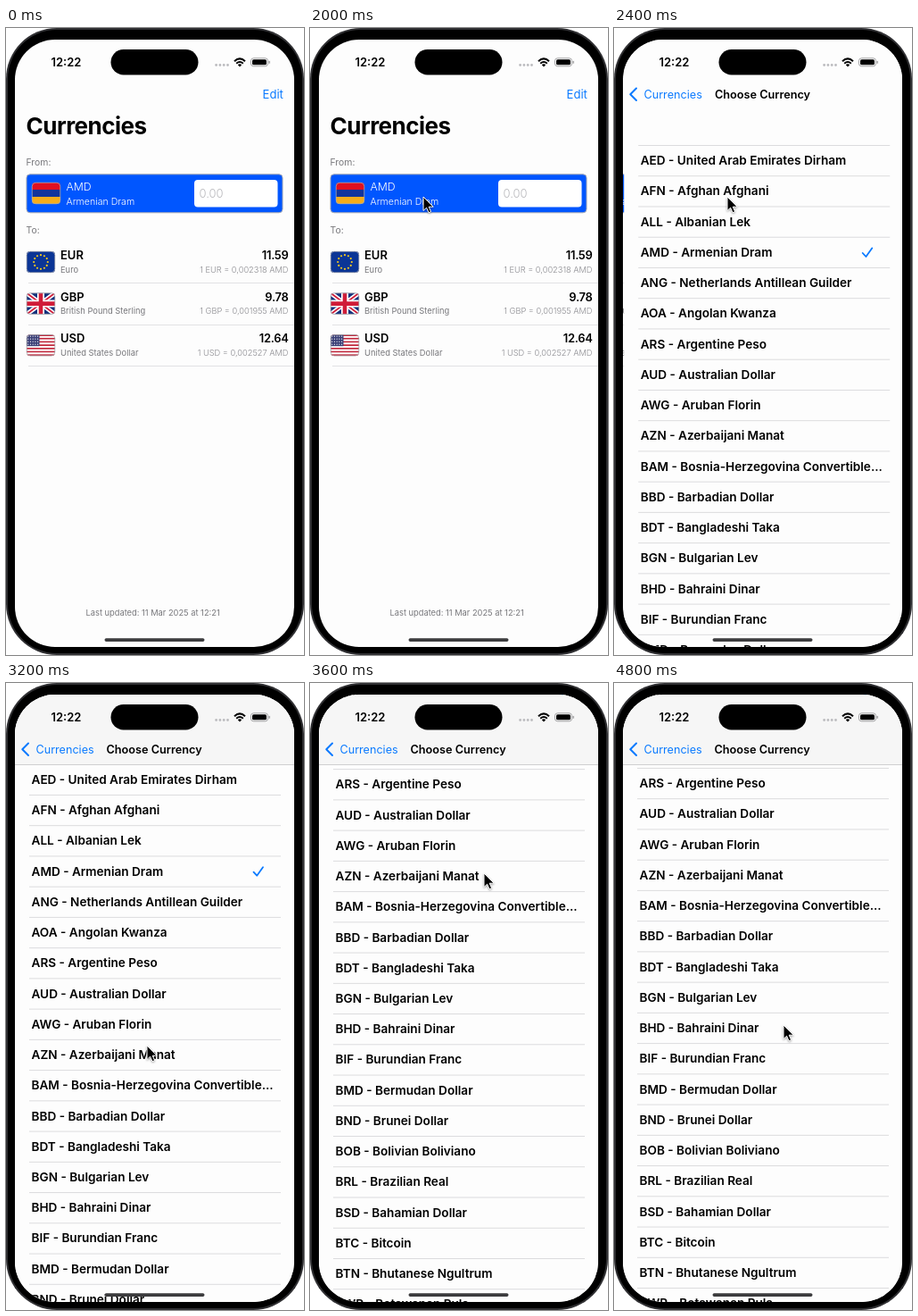
These frames come from a looping animation (334x702 px, 5 s). An HTML page:

```html
<!DOCTYPE html>
<html lang="en">
<head>
<meta charset="utf-8">
<title>Currency picker</title>
<style>
  html, body { margin: 0; width: 100%; height: 100%; overflow: hidden; background: #fff; }
  svg { display: block; width: 334px; height: 702px; }
  text { font-family: Inter, "Liberation Sans", sans-serif; white-space: pre; }
</style>
</head>
<body>
<svg id="stage" viewBox="0 0 334 702" xmlns="http://www.w3.org/2000/svg">
  <defs>
    <clipPath id="screen"><rect x="10" y="13" width="313" height="680" rx="45"/></clipPath>
    <clipPath id="flag"><rect width="32" height="24" rx="4"/></clipPath>
  </defs>
  <rect width="334" height="702" rx="57" fill="#303033"/>
  <rect x="2" y="2" width="330" height="698" rx="55" fill="#000"/>
  <g clip-path="url(#screen)">
    <rect x="10" y="13" width="313" height="680" fill="#fdfdfd"/>
    <g id="home"></g>
    <g id="picker">
      <rect x="10" y="13" width="313" height="680" fill="#fdfdfd"/>
      <g id="list"></g>
    </g>
    <g id="bar">
      <rect x="10" y="13" width="313" height="78.5" fill="#f6f6f6"/>
      <path d="M10 91.5H323" stroke="#cfcfd1"/>
    </g>
    <g id="edit"></g>
    <g id="big"></g>
    <g id="back"></g>
    <path id="chevron" d="M25 67.5L18.3 74.2L25 81" fill="none" stroke="#0a7aff" stroke-width="2" stroke-linecap="round" stroke-linejoin="round"/>
    <g id="title"></g>
    <g id="status"></g>
  </g>
  <path id="cursor" d="M0 0V15.5L3.6 12.2L6 17.7L8.6 16.6L6.2 11.2H11.2Z" fill="#000" stroke="#fff" stroke-width="1" stroke-linejoin="round" style="filter:drop-shadow(0 1px 1px rgba(0,0,0,.35))"/>
</svg>
<script>
const LOOP = 5000, STEP = 100, WIDTH = 313;
const BLUE = '#0a7aff', GREY = '#78787c', PALE = '#8c8c91';
const $ = id => document.getElementById(id);
const add = (id, markup) => $(id).insertAdjacentHTML('beforeend', markup);
const text = (s, x, y, size, { weight = 400, fill = '#000', end = false, gap = 0 } = {}) =>
  `<text x="${x}" y="${y}" font-size="${size}" font-weight="${weight}" fill="${fill}"` +
  ` text-anchor="${end ? 'end' : 'start'}" letter-spacing="${gap}em">${s}</text>`;
const rect = (x, y, w, h, fill, more = '') =>
  `<rect x="${x}" y="${y}" width="${w}" height="${h}" fill="${fill}" ${more}/>`;
const dot = (x, y, r, fill) => `<circle cx="${x}" cy="${y}" r="${r}" fill="${fill}"/>`;
const line = (d, stroke, width) => `<path d="${d}" stroke="${stroke}" stroke-width="${width}" fill="none"/>`;
const repeat = (n, make) => Array.from({ length: n }, (_, i) => make(i)).join('');

// Flags, each 32 by 24
const flags = {
  AMD: () => ['#e01020', '#12349c', '#f5ac1c'].map((c, i) => rect(0, i * 8, 32, 8, c)).join(''),
  EUR: () => rect(0, 0, 32, 24, '#0b3596') + repeat(12, i => {
    const a = i * Math.PI / 6;
    return dot(16 + 7.8 * Math.sin(a), 12 - 7.8 * Math.cos(a), 1.1, '#f9cb1c');
  }),
  GBP: () => {
    const cross = 'M16 0V24M0 12H32', diagonals = 'M0 0L32 24M32 0L0 24';
    return rect(0, 0, 32, 24, '#12307c') + line(diagonals, '#fff', 5) + line(diagonals, '#d01c38', 1.8) +
      line(cross, '#fff', 8) + line(cross, '#d01c38', 4.6);
  },
  USD: () => repeat(13, i => rect(0, i * 24 / 13, 32, 24 / 13, i % 2 ? '#fff' : '#c0283c')) +
    rect(0, 0, 14.5, 13, '#3a3f76') +
    repeat(20, i => dot(1.8 + i % 5 * 2.7, 2 + Math.floor(i / 5) * 3, .6, '#fff'))
};
const flag = (code, x, y) => `<g transform="translate(${x} ${y})"><g clip-path="url(#flag)">${flags[code]()}</g>` +
  rect(.25, .25, 31.5, 23.5, 'none', 'rx="4" stroke="#a9a9ae" stroke-width=".8"') + '</g>';

// Overview page
add('home',
  text('From:', 22.5, 154, 10.4, { fill: GREY }) +
  rect(23, 163.8, 287, 43, '#0056ff', 'rx="4" stroke="#a8aab4" stroke-width="1"') +
  flag('AMD', 29, 173) +
  text('AMD', 67.5, 182, 12.3, { weight: 300, fill: '#fff' }) +
  text('Armenian Dram', 67.5, 198.2, 10.6, { weight: 300, fill: '#fff' }) +
  rect(211, 170, 93.5, 30.5, '#fff', 'rx="4"') +
  text('0.00', 216.5, 190, 13, { weight: 300, fill: '#b8b8bc' }) +
  text('To:', 22.5, 229.8, 10.4, { fill: GREY }));

[['EUR', 'Euro', '11.59', '2318'], ['GBP', 'British Pound Sterling', '9.78', '1955'],
 ['USD', 'United States Dollar', '12.64', '2527']].forEach(([code, name, amount, rate], i) => {
  const y = 46.6 * i;
  add('home',
    flag(code, 23, 250 + y) +
    text(code, 61, 259 + y, 13, { weight: 600 }) +
    text(name, 61, 273.8 + y, 9.35, { fill: GREY }) +
    text(amount, 316.5, 259 + y, 12.9, { weight: 600, end: true, gap: -.02 }) +
    text(`1 ${code} = 0,00${rate} AMD`, 316.5, 273.6 + y, 9.25, { weight: 300, fill: PALE, end: true }) +
    rect(25, Math.round(285 + y), 298, 1, '#e2e2e4'));
});
add('home', text('Last updated: 11 Mar 2025 at 12:21', 89.5, 658, 9.3, { fill: GREY }));

// Currency list
const currencies = `AED - United Arab Emirates Dirham|AFN - Afghan Afghani|ALL - Albanian Lek|AMD - Armenian Dram
ANG - Netherlands Antillean Guilder|AOA - Angolan Kwanza|ARS - Argentine Peso|AUD - Australian Dollar|AWG - Aruban Florin
AZN - Azerbaijani Manat|BAM - Bosnia-Herzegovina Convertible...|BBD - Barbadian Dollar|BDT - Bangladeshi Taka
BGN - Bulgarian Lev|BHD - Bahraini Dinar|BIF - Burundian Franc|BMD - Bermudan Dollar|BND - Brunei Dollar
BOB - Bolivian Boliviano|BRL - Brazilian Real|BSD - Bahamian Dollar|BTC - Bitcoin|BTN - Bhutanese Ngultrum
BWP - Botswanan Pula|BYN - Belarusian Ruble`.split(/[|\n]/);
currencies.forEach((name, i) => {
  const y = 34.24 * i;
  add('list', rect(26, 131 + y, 282, 1, '#dcdcde') + text(name, 28.5, 153.2 + y, 13.6, { weight: 600 }));
});
add('list', `<path d="M277.5 252L281.2 256L288 246.5" fill="none" stroke="${BLUE}" stroke-width="1.8" stroke-linecap="round" stroke-linejoin="round"/>`);

add('edit', text('Edit', 310.8, 78.8, 13, { fill: BLUE, end: true }));
add('big', text('Currencies', 0, 0, 26, { weight: 700, gap: -.02 }));
add('back', text('Currencies', 0, 0, 12.6, { fill: BLUE }));
add('title', text('Choose Currency', 112.5, 78.8, 12.7, { weight: 600 }));

// Status bar, island and home indicator
add('status',
  text('12:22', 50.5, 43, 13, { weight: 600 }) +
  rect(117.5, 24, 98, 28.5, '#000', 'rx="14.2"') +
  repeat(4, i => dot(235.6 + i * 4.3, 41.5, 1.4, '#bdbdc0')) +
  line('M256 37.2Q262 31.6 268 37.2', '#000', 2) +
  line('M258.2 39.7Q262 36.2 265.8 39.7', '#000', 1.9) +
  '<path d="M259.8 41.2Q262 39.4 264.2 41.2L262 43.6Z"/>' +
  rect(274.5, 33.8, 19, 9, 'none', 'rx="2.9" stroke="#9a9a9c" stroke-width=".9"') +
  rect(276, 35.3, 16, 6, '#000', 'rx="1.6"') +
  rect(294.6, 36.8, 1.3, 3, '#9a9a9c', 'rx=".6"') +
  rect(110.5, 683.2, 112, 3.8, '#3c3c3e', 'rx="1.9"'));

// Rows of time followed by values
const pointer = [
  [400, 20, 288], [600, 70, 243], [800, 100, 218], [1000, 115, 204], [1300, 123, 197], [1700, 127, 190],
  [2000, 127, 189], [2400, 127, 189], [2600, 138, 290], [2700, 138, 290], [2900, 152, 440], [3000, 154, 446],
  [3100, 156, 432], [3200, 158, 406], [3300, 167, 360], [3400, 180, 290], [3500, 191, 234], [3600, 195, 213],
  [3800, 195, 224], [3900, 195, 244], [4000, 192, 290], [4100, 188, 342], [4200, 186, 368], [4300, 186, 368],
  [4500, 188, 379], [4800, 190, 383]];
const scroll = [[3000, 0], [3100, 14], [3200, 40.3], [3300, 88], [3400, 162], [3500, 219], [3600, 240.3], [3700, 241.2], [3800, 241.5]];

const mix = (a, b, k) => a + (b - a) * k;
const clamp = v => Math.max(0, Math.min(1, v));
function sample(track, t) {
  const i = track.findIndex(row => row[0] > t);
  if (i < 0) return track.at(-1).slice(1);
  if (!i) return track[0].slice(1);
  const a = track[i - 1], b = track[i], k = (t - a[0]) / (b[0] - a[0]);
  return a.slice(1).map((v, n) => mix(v, b[n + 1], k));
}
// Critically damped spring for the page push
function pushed(t) {
  if (t < 2100) return 0;
  if (t >= 2600) return 1;
  const k = (t - 2050) * .022;
  return 1 - (1 + k) * Math.exp(-k);
}
const place = (id, x, y, scale = 1) => $(id).setAttribute('transform', `translate(${x} ${y}) scale(${scale})`);
const fade = (id, alpha) => $(id).setAttribute('opacity', clamp(alpha));

function draw(t) {
  const p = pushed(t), [offset] = sample(scroll, t), [x, y] = sample(pointer, t);
  place('home', -.3 * WIDTH * p, 0);
  place('picker', WIDTH * (1 - p), 0);
  place('list', 0, -offset);
  fade('bar', (offset - 25) / 15);
  fade('edit', 1 - p * 1.5);
  const tx = mix(22.5, 33.5, p), ty = mix(119, 78.8, p);
  place('big', tx, ty, mix(1, .48, p));
  fade('big', 1 - p * 1.4);
  place('back', tx, ty, mix(2.06, 1, p));
  fade('back', p * 1.6 - .6);
  fade('chevron', p);
  place('title', 110 * (1 - p), 0);
  fade('title', p);
  place('cursor', x, y);
  fade('cursor', t >= 400 ? 1 : 0);
}
function tick() {
  draw(Math.floor(performance.now() % LOOP / STEP) * STEP);
  requestAnimationFrame(tick);
}
tick();
</script>
</body>
</html>
```
